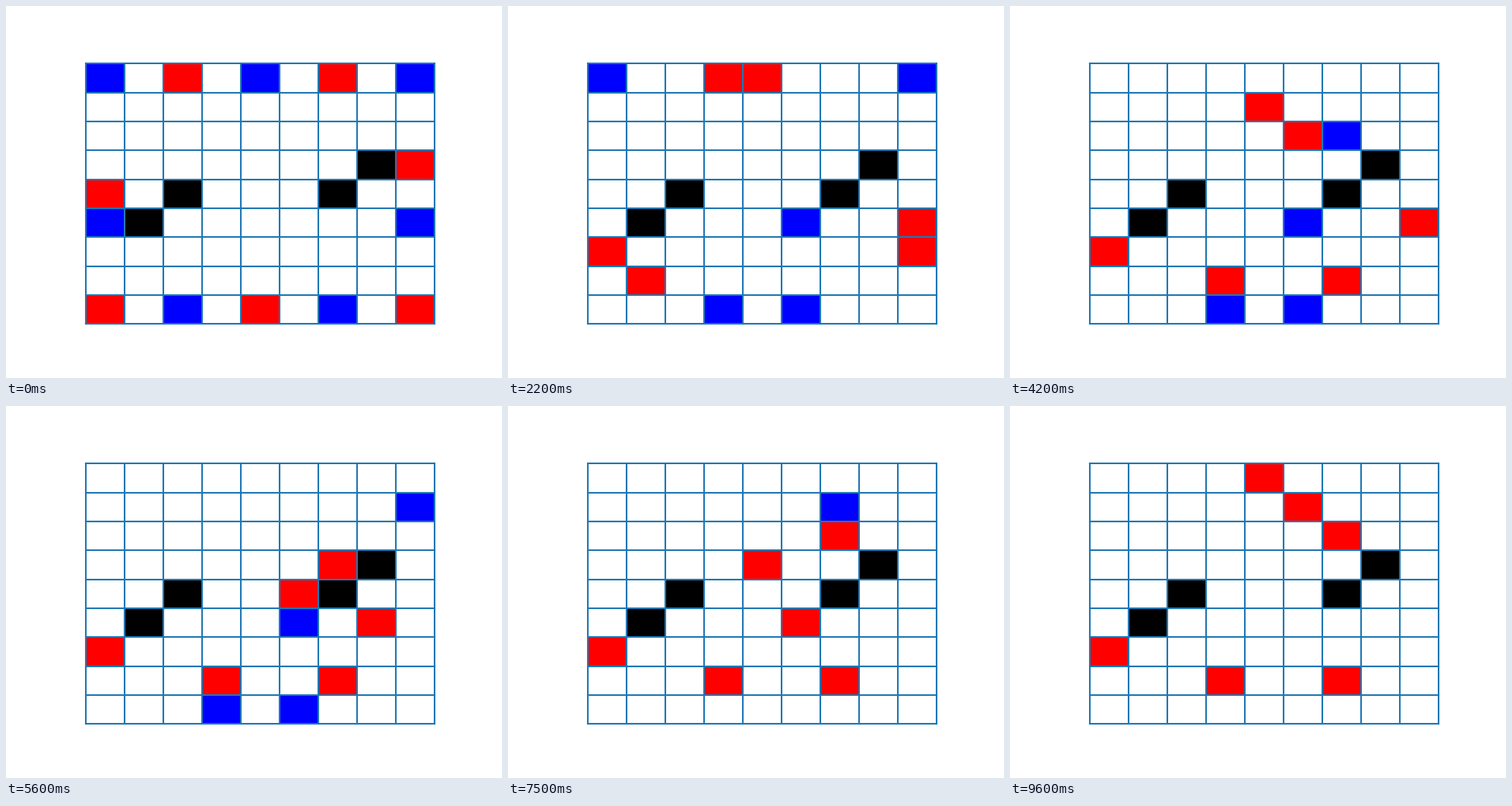
Recreate the animation shown at these times as a matplotlib script. Size 640x480 px, loop 9700 ms.

```python
import matplotlib.pyplot as plt
from matplotlib.animation import FuncAnimation
from matplotlib.patches import Rectangle

SIZE = 9
COLUMNS = "abcdefghi"
STEPS = {"N": (0, 1), "S": (0, -1), "E": (1, 0), "W": (-1, 0)}

SETUP = {
    "blue": "a9 e9 i9 a4 i4 c1 g1",
    "red": "c9 g9 i6 a5 a1 e1 i1",
    "black": "h6 c5 g5 b4",
}

# Blue and red take turns: square, direction, then any captured square.
MOVES = """
c1E i6S g1W:e1 i1N i4W i2N a4S a5S a3S a4S:a2
h4W c9E g4W g9W:e9 i9S a1N i8N a2E a9S i5S
a8N f9W a9S b2E a8S e9S a7E e8E b7E d9S
c7E d8E d7E c2E i9S i3S i8S i2W i7W h2W
h7W f8S:e7 g7N f7S g8E f6S h8E e8E i8S f8S
i7N f7E i8N g7S i9S i4W i8N h4W:f4 f1N g4W
f2W g2W:e2 d1E f2E e1N g6N e2N g7W e3N f7E
i9W f5W:e4 h9W e5N g9S e6N g8W e7E f8N f7N
f9W f4N e9W f5N d9S f6N d8N f8W d9S f7N
d8N e8N d9S f8N d8E f9S:e8
""".split()


def square(name):
    return COLUMNS.index(name[0]), int(name[1]) - 1


def start_board():
    return {square(name): color
            for color, names in SETUP.items() for name in names.split()}


def play(board, move):
    """Return the board after one move."""
    board = dict(board)
    path, _, captured = move.partition(":")
    x, y = square(path)
    dx, dy = STEPS[path[2]]
    board[x + dx, y + dy] = board.pop((x, y))
    if captured:
        del board[square(captured)]
    return board


boards = [start_board()]
for move in MOVES:
    boards.append(play(boards[-1], move))

fig, ax = plt.subplots(figsize=(6.4, 4.8), dpi=100)
pad = 0.05 * SIZE
ax.set_xlim(-pad, SIZE + pad)
ax.set_ylim(-pad, SIZE + pad)
ax.axis("off")

cells = {}
for x in range(SIZE):
    for y in range(SIZE):
        cells[x, y] = ax.add_patch(Rectangle((x, y), 1, 1, fc="white", ec="none"))

for i in range(SIZE + 1):
    ax.plot([0, SIZE], [i, i], color="C0", lw=1.5)
    ax.plot([i, i], [0, SIZE], color="C0", lw=1.5)


def draw(frame):
    board = boards[frame]
    for pos, cell in cells.items():
        cell.set_facecolor(board.get(pos, "white"))
    return list(cells.values())


anim = FuncAnimation(fig, draw, frames=len(boards), interval=100,
                     repeat=True, repeat_delay=0)
plt.show()
```
